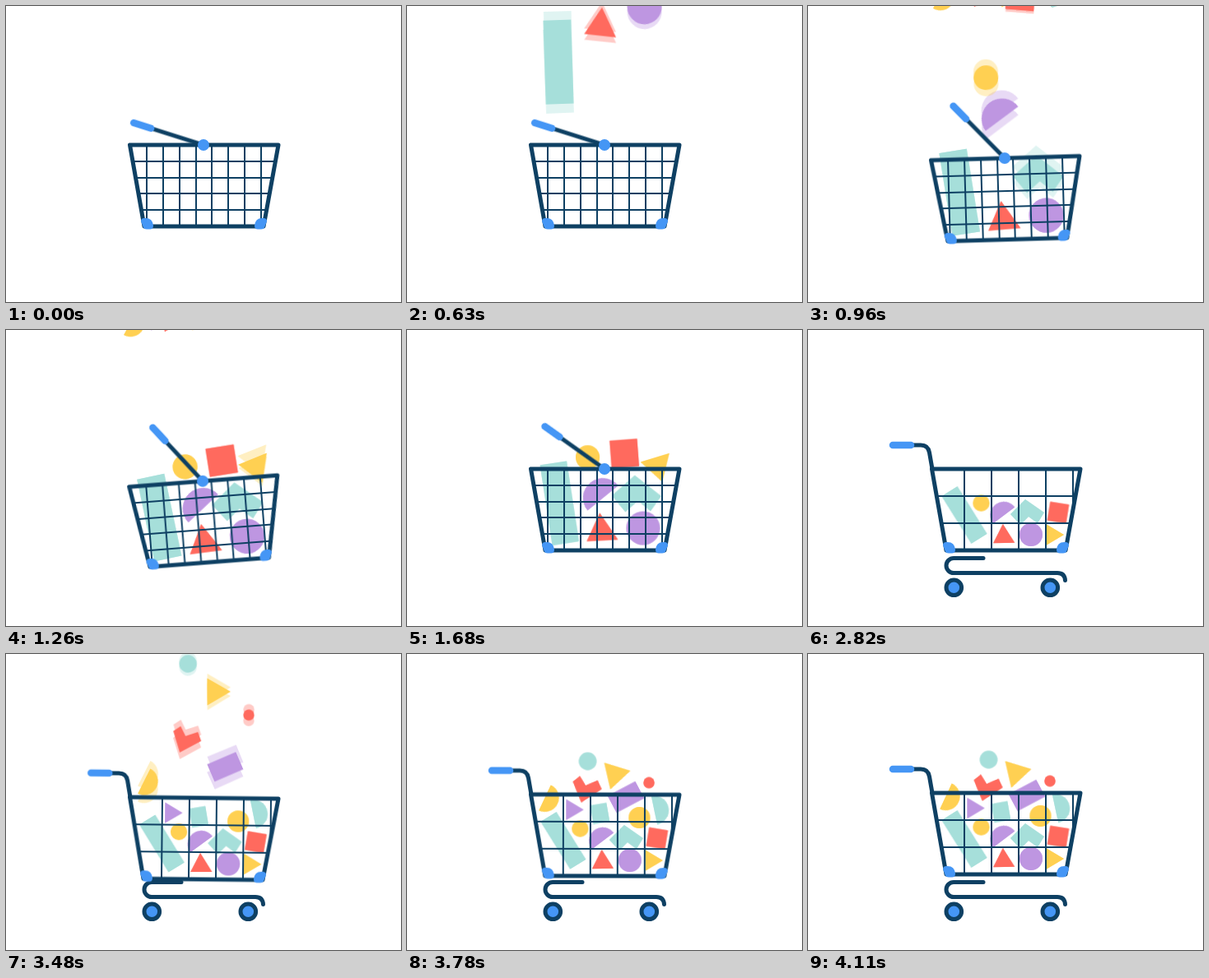
An HTML page for the animation above (4.53 s loop, 480 px wide and 360 px high).

```html
<!DOCTYPE html>
<html lang="en">
<head>
<meta charset="utf-8">
<title>Basket to cart</title>
<style>
  :root { --navy: #0e4063; --blue: #4596f5; }
  html, body { margin: 0; width: 100%; height: 100%; overflow: hidden; background: #fff; }
  svg { display: block; width: 480px; height: 360px; overflow: hidden; }
  svg * { animation: 4530ms linear infinite; }
  .line { fill: none; stroke: var(--navy); stroke-width: 5; stroke-linecap: round; stroke-linejoin: round; }
  .grip { fill: none; stroke: var(--blue); stroke-width: 8.5; stroke-linecap: round; }
  .blue { fill: var(--blue); }

  #load { transform-origin: 240px 169px; animation-name: dip; }
  @keyframes dip {
    0%, 17.2% { transform: translate(0, 0) rotate(0deg); }
    18.5% { transform: translate(0, 2px) rotate(0deg); }
    21.2% { transform: translate(-1px, 16px) rotate(-1.6deg); animation-timing-function: ease-out; }
    23.8% { transform: translate(-1px, 24px) rotate(-3.5deg); animation-timing-function: ease-in-out; }
    27.8% { transform: translate(-1px, 15px) rotate(-4.5deg); animation-timing-function: ease-out; }
    33.1%, 69.5% { transform: translate(0, 0) rotate(0deg); animation-timing-function: ease-in; }
    76.8% { transform: translate(0, 6px) rotate(.6deg); animation-timing-function: ease-out; }
    79.5% { transform: translate(0, 8px) rotate(.4deg); animation-timing-function: ease-in-out; }
    86.1% { transform: translate(0, -1px) rotate(0deg); }
    90%, 100% { transform: translate(0, 0) rotate(0deg); }
  }

  #swing { transform-origin: 240px 169px; animation-name: swing; }
  @keyframes swing {
    0%, 17.2% { transform: rotate(17.6deg); }
    21.2% { transform: rotate(47deg); animation-timing-function: ease-out; }
    23.8% { transform: rotate(55deg); animation-timing-function: ease-in-out; }
    27.8% { transform: rotate(51.5deg); animation-timing-function: ease-in-out; }
    33.1% { transform: rotate(36deg); }
    41%, 100% { transform: rotate(35deg); }
  }
  #arm { stroke-dasharray: 90 200; animation-name: arm; }
  @keyframes arm {
    0%, 41% { stroke-dashoffset: 0; }
    45.7% { stroke-dashoffset: 38; }
    50.8%, 100% { stroke-dashoffset: 94; }
  }
  #armGrip { stroke-dasharray: 22 90; animation-name: armGrip; }
  @keyframes armGrip {
    0%, 39.3% { stroke-dashoffset: 0; }
    43.5%, 100% { stroke-dashoffset: 28; }
  }
  #pivot { transform-origin: 240px 169px; animation-name: pivot; }
  @keyframes pivot {
    0%, 48.5% { transform: scale(1); }
    53%, 100% { transform: scale(0); }
  }

  .bar { stroke: var(--navy); stroke-width: 2; animation-name: spread; }
  @keyframes spread {
    0%, 40.2% { transform: translate(var(--from)); animation-timing-function: ease-in-out; }
    52.3%, 100% { transform: translate(var(--to)); }
  }

  #post { stroke-dasharray: 70 200; animation-name: post; }
  @keyframes post {
    0%, 40.4% { stroke-dashoffset: 74; }
    45.7% { stroke-dashoffset: 35; }
    52%, 100% { stroke-dashoffset: 0; }
  }
  #postGrip { stroke-dasharray: 22 90; animation-name: postGrip; }
  @keyframes postGrip {
    0%, 50% { stroke-dashoffset: 28; }
    53.5%, 100% { stroke-dashoffset: 0; }
  }
  #rail { stroke-dasharray: 208 400; animation-name: rail; }
  @keyframes rail {
    0%, 40.4% { stroke-dashoffset: 212; }
    45.7% { stroke-dashoffset: 108; }
    51%, 100% { stroke-dashoffset: 0; }
  }

  .wheel { fill: var(--blue); stroke: var(--navy); transform-box: fill-box; transform-origin: center; }
  #rear { animation-name: popRear, ringRear; }
  #front { animation-name: popFront, ringFront; }
  @keyframes popRear {
    0%, 40.8% { transform: scale(0); }
    45.7% { transform: scale(1.1); }
    49%, 100% { transform: scale(1); }
  }
  @keyframes ringRear {
    0%, 47% { stroke-width: 0; }
    52%, 100% { stroke-width: 5px; }
  }
  @keyframes popFront {
    0%, 46.3% { transform: scale(0); }
    51% { transform: scale(1.1); }
    54%, 100% { transform: scale(1); }
  }
  @keyframes ringFront {
    0%, 51% { stroke-width: 0; }
    56%, 100% { stroke-width: 5px; }
  }
</style>
</head>
<body>
<svg viewBox="0 0 480 360">
  <defs>
    <clipPath id="inside"><path d="M150.5 169H331L313 268H168Z"/></clipPath>
    <path id="corner" d="M168 258Q178 257 179 267Q179 271.500 175 271.500H171Q167 271.500 166 267L164 262Q164 258 168 258Z"/>
  </defs>
  <path id="rail" class="line" d="M213 277.500H177a9 9 0 0 0 0 18H303q9 0 9.500 9"/>
  <circle id="rear" class="wheel" cx="177.300" cy="313.300" r="9.300"/>
  <circle id="front" class="wheel" cx="294.300" cy="313.300" r="9.300"/>
  <g id="load">
    <g id="goods"></g>
    <g id="grid" clip-path="url(#inside)"></g>
    <path id="post" class="line" d="M151 169L147.500 149Q146 140 137 140H103"/>
    <path id="postGrip" class="grip" d="M125 140H103"/>
    <path class="line" d="M150.500 169H331L313 268H168Z"/>
    <use href="#corner" class="blue"/>
    <use href="#corner" class="blue" transform="translate(481 0) scale(-1 1)"/>
    <g id="swing">
      <path id="arm" class="line" d="M240 169H152"/>
      <path id="armGrip" class="grip" d="M173 169H151"/>
    </g>
    <circle id="pivot" class="blue" cx="240" cy="169" r="7"/>
  </g>
</svg>
<script>
  const LOOP = 4530, FALL = 400, BLUR = 10;
  const GRAVITY = 'cubic-bezier(.333, 0, .667, .333)';
  const TEAL = '#a6dfda', RED = '#ff6a5e', PURPLE = '#be96e1', YELLOW = '#ffd052';
  const goods = document.getElementById('goods');
  const grid = document.getElementById('grid');

  const disc = r => `M${-r} 0A${r} ${r} 0 0 1 ${r} 0A${r} ${r} 0 0 1 ${-r} 0Z`;
  const half = r => `M${-r} 0A${r} ${r} 0 0 1 ${r} 0Z`;
  const box = (w, h) => `M${-w / 2} ${-h / 2}h${w}v${h}h${-w}Z`;
  const wedge = 'M-10 -12.500L11 0L-10 12.500Z';

  function addPath(parent, attributes) {
    const path = document.createElementNS('http://www.w3.org/2000/svg', 'path');
    for (const [name, value] of Object.entries(attributes)) path.setAttribute(name, value);
    return parent.appendChild(path);
  }

  // Grid lines slide apart until only a coarse mesh remains.
  for (let i = 0; i < 8; i++) {
    const from = 171 + 19.85 * i, to = Math.min(190 + 33.1 * i, 356);
    addPath(grid, { class: 'bar', d: 'M0 160V280', style: `--from:${from}px,0px;--to:${to}px,0px` });
  }
  [202, 235, 277, 281].forEach((to, i) => {
    const from = 189 + 19.7 * i;
    addPath(grid, { class: 'bar', d: 'M140 0H340', style: `--from:0px,${from}px;--to:0px,${to}px` });
  });

  const pose = (time, [x, y, turn], scale, easing = 'linear') => ({
    time, easing,
    transform: `translate(${x}px, ${y}px) rotate(${turn}deg) scale(${scale})`
  });

  // Faint early and late copies soften whatever moves fast.
  function addShape(d, fill, poses) {
    for (const shift of [-BLUR, BLUR, 0]) {
      const path = addPath(goods, { d, fill, opacity: shift ? .35 : 1 });
      const steps = poses.map(({ time, transform, easing }) =>
        ({ offset: (time + shift) / LOOP, transform, easing }));
      const frames = [{ ...steps[0], offset: 0, easing: 'linear' }, ...steps,
        { ...steps[steps.length - 1], offset: 1 }];
      path.animate(frames, { duration: LOOP, iterations: Infinity });
    }
  }

  // Large pieces land, then shrink as the basket becomes a cart.
  function dropLarge(d, fill, land, first, middle, last, top = -45) {
    addShape(d, fill, [
      pose(land - FALL, [first[0], top, first[2] + 12], 1.5, GRAVITY),
      pose(land, first, 1.5),
      pose(1500, first, 1.5, 'ease-in'),
      pose(2070, middle, 1.17, 'ease-out'),
      pose(2450, last, 1)
    ]);
  }

  function dropSmall(d, fill, land, rest, spin = 8) {
    addShape(d, fill, [
      pose(land - FALL, [rest[0], -30, rest[2] + spin], 1, GRAVITY),
      pose(land, rest, 1)
    ]);
  }

  dropLarge(box(22.5, 68), TEAL, 740, [184, 209, -7.5], [193, 221, -16], [190, 225, -32], -90);
  dropLarge('M-1 -12L13 11H-13Z', RED, 840, [236.5, 239, -3], [237, 245.5, -3], [238, 248, -1]);
  dropLarge(disc(14), PURPLE, 870, [288.6, 240, 0], [277, 247, 0], [271, 249, 0]);
  dropLarge('M-3 -16L20 0L12 13L1 5L-9 15L-21 2Z', TEAL, 967, [281, 198, 4], [272, 214, 0], [267, 222, 0]);
  dropLarge(half(16.5), PURPLE, 1033, [238, 202, -39], [238, 218, -40], [238, 225.5, -37]);
  dropLarge(disc(10), YELLOW, 1053, [220, 150, 0], [217, 184, 0], [210.5, 210.5, 0]);
  dropLarge(box(23, 23), RED, 1240, [265, 146, -4.5], [259, 175, -3], [304, 222, 9]);
  dropLarge(wedge, YELLOW, 1265, [307, 165, 72], [297, 194, 79], [300, 249, 0]);

  dropSmall(box(20, 23), TEAL, 3190, [234.5, 192, -10]);
  dropSmall(disc(13), YELLOW, 3300, [282.5, 197, 0]);
  dropSmall(half(17.5), TEAL, 3360, [300.5, 188, 78]);
  dropSmall(wedge, PURPLE, 3465, [203.5, 187.5, 0]);
  dropSmall(half(17), YELLOW, 3505, [167.5, 173, 115]);
  dropSmall(box(38, 23), PURPLE, 3524, [266, 172, -28], 20);
  dropSmall('M-15 -11L-6 -17L0 -5L15 -10L19 1L-7 15Z', RED, 3554, [217.5, 163, -5], 14);
  dropSmall(disc(6.7), RED, 3590, [294, 154.5, 0]);
  dropSmall('M-9.500 -16.500L19 0L-9.500 16.500Z', YELLOW, 3628, [252.7, 144.3, -13], 20);
  dropSmall(disc(10.7), TEAL, 3690, [219.5, 128.5, 0]);
</script>
</body>
</html>
```
